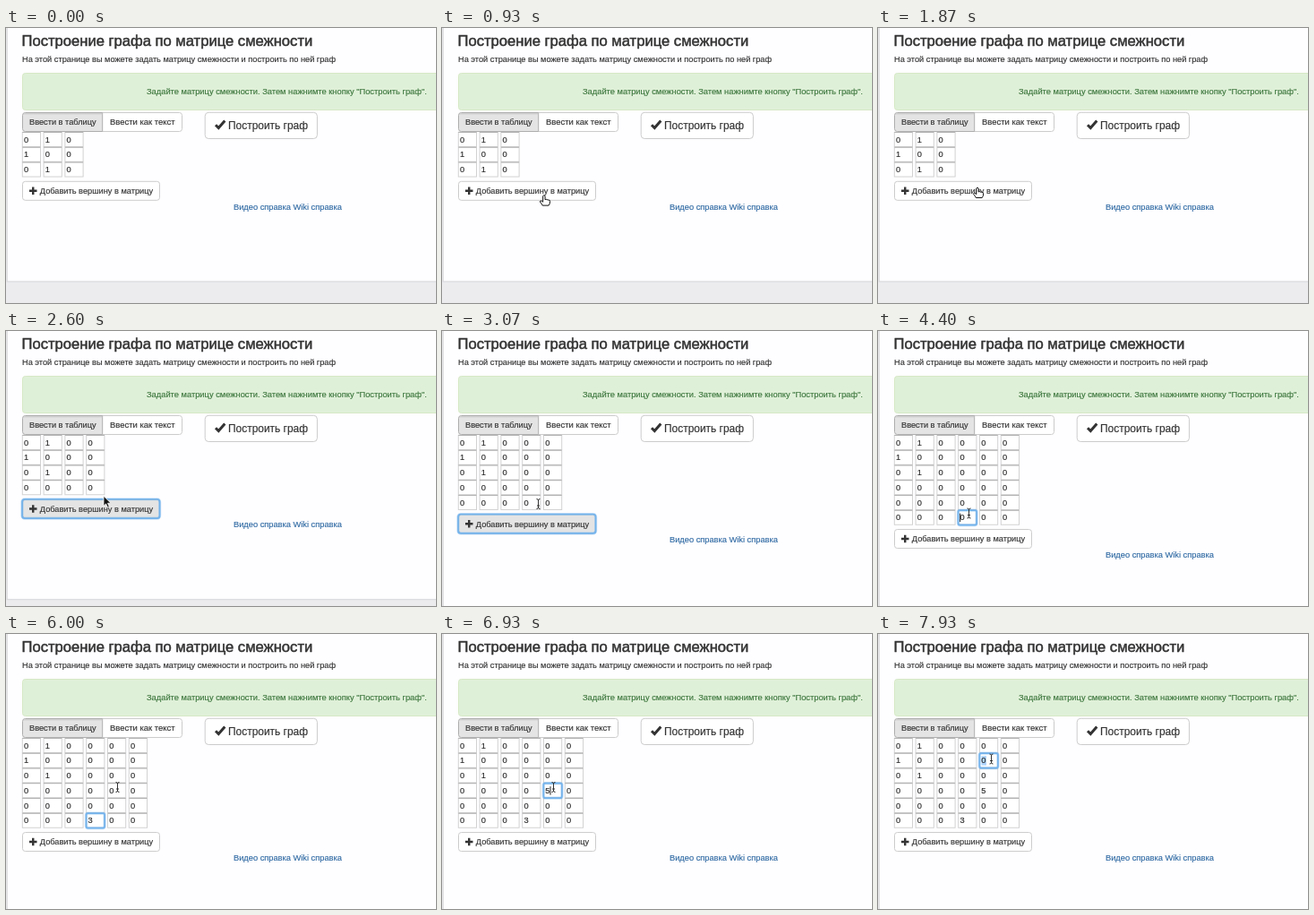
Recreate the animation shown at these times as an HTML page. Size 480 by 307 pixels, loop 8 s.

```html
<!DOCTYPE html>
<html lang="ru">
<head>
<meta charset="utf-8">
<title>Матрица смежности</title>
<style>
  html, body { margin: 0; width: 100%; height: 100%; overflow: hidden; background: #ececef; }
  svg { display: block; width: 480px; height: 307px; }
  text { font-family: "Liberation Sans", Arial, sans-serif; font-size: 9.23px; fill: #333; stroke: #333; stroke-width: .15px; white-space: pre; }
  .title { font-size: 16.6px; stroke-width: .5px; }
  .alert { font-size: 9.32px; fill: #3c763d; stroke: #3c763d; }
  .button { fill: #fff; stroke: #ccc; }
  .pressed { fill: #e4e4e4; stroke: #adadad; }
  .icon { fill: none; stroke: #333; stroke-width: 2.4; }
  .link { fill: #2f6aa3; stroke: #2f6aa3; font-size: 9.28px; }
  .ring { fill: none; stroke: #74b3ec; stroke-width: 1.7; }
  .glow { fill: none; stroke: #74b3ec; stroke-width: 3.2; opacity: .4; }
  .cell rect { fill: #fff; stroke: #d2d2d2; }
  .cell path { stroke: #b0b0b0; }
  .cell text { font-size: 9.3px; fill: #222; }
</style>
</head>
<body>
<svg viewBox="0 0 480 307">
  <rect id="panel" x="1.2" y="-10" width="490" height="293" fill="#fefdff" stroke="#d4d4d8"/>
  <text class="title" x="17.5" y="19.6">Построение графа по матрице смежности</text>
  <text x="18" y="37.800">На этой странице вы можете задать матрицу смежности и построить по ней граф</text>

  <rect x="18.5" y="50.5" width="480" height="41" rx="3" fill="#dff0d8" stroke="#d6e9c6"/>
  <text class="alert" x="157" y="73.6">Задайте матрицу смежности. Затем нажнимте кнопку "Построить граф".</text>

  <rect class="button" x="100" y="94.5" width="96.5" height="21" rx="3"/>
  <path class="pressed" d="M107.700 94.5H21.5q-3 0-3 3v15q0 3 3 3h86.200z"/>
  <path d="M20 95.700h87.200" stroke="#d2d2d2" stroke-width="1.6"/>
  <text x="26" y="108.200">Ввести в таблицу</text>
  <text x="116" y="108.200" style="font-size:9.45px">Ввести как текст</text>

  <rect class="button" x="222.200" y="94.300" width="125.200" height="29.200" rx="4"/>
  <path class="icon" d="M234 108.300l3.300 3.300 7-8" style="stroke-width:3"/>
  <text x="248" y="113" style="font-size:11.95px">Построить граф</text>

  <g id="table"></g>
  <g id="below">
    <rect id="add" class="button" x="18.500" y="171.300" width="153" height="21" rx="3"/>
    <g id="addRing">
      <rect class="glow" x="18" y="171" width="153.600" height="21.400" rx="3"/>
      <rect class="ring" x="18" y="171" width="153.600" height="21.400" rx="3"/>
    </g>
    <path class="icon" d="M26 181.700h8.500M30.250 177.500v8.500"/>
    <text x="37.800" y="185.100">Добавить вершину в матрицу</text>
    <text class="link" x="254" y="202.500">Видео справка Wiki справка</text>
  </g>
  <g id="focus">
    <rect class="glow" x="-.2" y="-.1" width="20.600" height="16.500" rx="2"/>
    <rect class="ring" x="-.2" y="-.1" width="20.600" height="16.500" rx="2"/>
    <path id="caret" d="M0 3.500v9.500" stroke="#222"/>
  </g>

  <g id="pointer">
    <path id="arrow" d="M0 0v11l2.600-2.400 1.900 4.200 1.900-.8-1.900-4.100h3.500z" fill="#111" stroke="#fff" stroke-width=".8"/>
    <path id="hand" d="M-1.200 1q1.200-2 2.400 0v4q1.300-1 2 .2 1.200-.7 1.800.4 1.700-.6 1.700 1.200 0 3-1.500 4.700H-1.700Q-2.500 9.500-4.500 7.300q.3-1.800 2-.7l1.300 1z" fill="#fff" stroke="#111" stroke-width="1"/>
    <path id="beam" d="M-2.500-5.500q2 0 2 1.500 0-1.500 2-1.500M-.5-4.500v9M-2.500 5.500q2 0 2-1.500 0 1.500 2 1.500M-2 2h3" fill="none" stroke="#333" stroke-width="1"/>
  </g>
</svg>
<script>
const LOOP = 8000, MAX = 6, COL = 23.8, ROW = 16.75, LEFT = 18.3, TOP = 116.4;
const $ = id => document.getElementById(id);
const show = (el, on) => { el.style.display = on ? '' : 'none'; };

// Moments when a vertex is added, and edits of single cells.
const additions = [2150, 2850, 3560];
const edits = [
  { row: 5, col: 3, click: 4200, select: 4550, type: 5150, value: '3' },
  { row: 3, col: 4, click: 6120, select: 6300, type: 6800, value: '5' },
  { row: 1, col: 4, click: 7700, select: 7860, type: Infinity, value: '' }
];
// Pointer stops: time, x, y
const stops = [
  [0, 150, 330], [100, 150, 330], [850, 114, 187], [1500, 111, 178], [2250, 111, 178],
  [2550, 109, 184.300], [2620, 109, 184.300], [2800, 108, 193], [3100, 108, 193],
  [3450, 107, 212], [3650, 107, 212], [4100, 102, 203.500], [5300, 102, 203.500],
  [5950, 125, 171], [7000, 125, 171], [7650, 127, 139.500], [8000, 127, 139.500]
];

const cells = [];
for (let row = 0; row < MAX; row++) for (let col = 0; col < MAX; col++) {
  const el = document.createElementNS('http://www.w3.org/2000/svg', 'g');
  const edge = (row === 0 && col === 1) || (row === 1 && col === 0) || (row === 2 && col === 1);
  el.setAttribute('class', 'cell');
  el.setAttribute('transform', `translate(${LEFT + col * COL} ${TOP + row * ROW})`);
  el.innerHTML = `<rect width="20.200" height="16.100"/><path d="M0 0h20.200"/>
    <rect class="mark" x="2" y="3" width="5.500" height="10.500" style="fill:#add3fb;stroke:none"/>
    <text x="1.700" y="11.300"></text>`;
  $('table').append(el);
  cells.push({ row, col, el, start: edge ? '1' : '0',
    mark: el.querySelector('.mark'), label: el.querySelector('text') });
}

function pointerAt(t) {
  const i = Math.max(1, stops.findIndex(s => s[0] >= t));
  const [t0, x0, y0] = stops[i - 1], [t1, x1, y1] = stops[i];
  const p = (t - t0) / (t1 - t0), e = p * p * (3 - 2 * p);
  return [x0 + (x1 - x0) * e, y0 + (y1 - y0) * e];
}

function pointerKind(x, y, size, shift) {
  if (x > 18 && x < 172 && y > 171 + shift && y < 192.500 + shift) return 'hand';
  const col = (x - LEFT) / COL, row = (y - TOP) / ROW;
  const inside = col >= 0 && col < size && row >= 0 && row < size;
  return inside && col % 1 < .87 ? 'beam' : 'arrow';
}

function draw(t) {
  const added = additions.filter(a => t >= a).length;
  const size = 3 + added, shift = added * ROW;
  const active = edits.filter(e => t >= e.click).pop();
  const selected = active && t >= active.select && t < active.type;

  for (const c of cells) {
    const edit = edits.find(e => e.row === c.row && e.col === c.col);
    show(c.el, c.row < size && c.col < size);
    show(c.mark, selected && edit === active);
    c.label.textContent = edit && t >= edit.type ? edit.value : c.start;
  }

  $('below').setAttribute('transform', `translate(0 ${shift})`);
  $('panel').setAttribute('height', 293 + shift);
  const buttonFocused = added > 0 && !active;
  $('add').setAttribute('class', buttonFocused ? 'pressed' : 'button');
  show($('addRing'), buttonFocused);

  show($('focus'), active);
  if (active) {
    const typed = t >= active.type;
    const since = t - (typed ? active.type : active.click);
    $('focus').setAttribute('transform', `translate(${LEFT + active.col * COL} ${TOP + active.row * ROW})`);
    $('caret').setAttribute('transform', `translate(${typed ? 7.500 : 2} 0)`);
    show($('caret'), !selected && since % 1000 < 500);
  }

  const [x, y] = pointerAt(t), kind = pointerKind(x, y, size, shift);
  $('pointer').setAttribute('transform', `translate(${x} ${y})`);
  for (const id of ['arrow', 'hand', 'beam']) show($(id), id === kind);
}

const begin = performance.now();
function frame() {
  draw((performance.now() - begin) % LOOP);
  requestAnimationFrame(frame);
}
frame();
</script>
</body>
</html>
```
